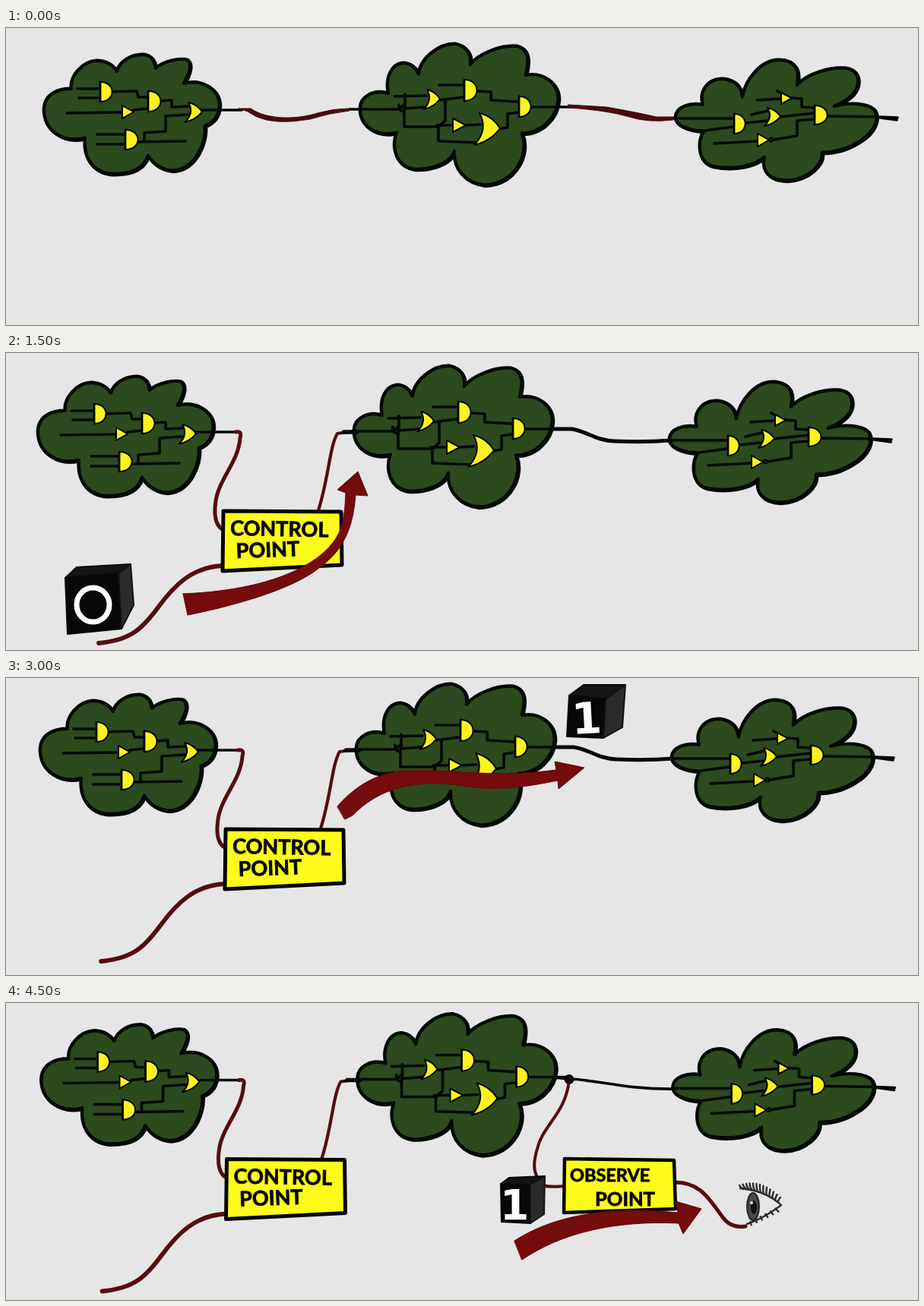
These frames come from a looping animation (1200x391 px, 6 s). An HTML page:

```html
<!DOCTYPE html>
<html lang="en">
<head>
<meta charset="utf-8">
<title>Control and observe points</title>
<style>
  html, body { margin: 0; width: 100%; height: 100%; overflow: hidden; background: #e6e6e6; }
  svg { display: block; width: 100%; height: 100%; }
  path, circle, ellipse { stroke-linecap: round; stroke-linejoin: round; }
  .cloud { fill: #2c4a1d; stroke: #030806; stroke-width: 4.4; }
  .shade { fill: #030806; stroke: #030806; stroke-width: 4.5; }
  .wire { fill: none; stroke: #030806; stroke-width: 3.7; }
  .gate { fill: #fdf220; stroke: #030806; stroke-width: 2; }
  .cord { fill: none; stroke: #560d10; stroke-width: 5; }
  .ribbon { fill: #480b0e; stroke: #480b0e; stroke-width: 1; }
  .arrow { fill: #740b0d; stroke: #640709; stroke-width: 1; }
  .panel { fill: #fcfb1b; stroke: #050505; stroke-width: 5; }
  .label { font: 700 27px Lato, "Open Sans", sans-serif; fill: #090906; stroke: #090906; stroke-width: .8; }
  .digit { font: 700 57px "DejaVu Sans", sans-serif; fill: #fff; }
  .eye { fill: none; stroke: #2c2c2c; stroke-width: 2.4; }
</style>
</head>
<body>
<svg viewBox="0 0 1200 391" preserveAspectRatio="none"><g id="world"></g></svg>
<script>
const HOLD = 1500;
const world = document.getElementById("world");

const path = (cls, d, extra = "") => `<path class="${cls}" d="${d}" ${extra}/>`;
const text = (cls, x, y, s, extra = "") => `<text class="${cls}" x="${x}" y="${y}" ${extra}>${s}</text>`;
const cloud = d => path("shade", d, 'transform="translate(1 1)"') + path("cloud", d, 'transform="translate(-.2 -.2)"');
// Gates take their top left corner, width and height.
const and = (x, y, w, h) => path("gate", `M${x} ${y}C${x + 1.3 * w} ${y} ${x + 1.3 * w} ${y + h} ${x} ${y + h}Z`)
  + path("wire", `M${x} ${y}v${h}`, 'style="stroke-width:2.8"');
const or = (x, y, w, h) => path("gate", `M${x} ${y}Q${x + .65 * w} ${y + .1 * h} ${x + w} ${y + .48 * h}
  Q${x + .55 * w} ${y + .88 * h} ${x - .25 * w} ${y + h}Q${x + .45 * w} ${y + .52 * h} ${x} ${y}Z`);
const tri = (x, y, w, h) => path("gate", `M${x} ${y}L${x + w} ${y + h / 2}L${x} ${y + h}Z`);
// Shows its content only in the listed scenes, drawn at its own offset.
const only = (scenes, x, y, content) => `<g data-scenes="${scenes}" transform="translate(${x} ${y})">${content}</g>`;
const cube = (front, top, side) => path("", front, 'fill="#070809" stroke="#070809" stroke-width="2"')
  + path("", top, 'fill="#141516" stroke="#070809" stroke-width="2"')
  + path("", side, 'fill="#292a2b" stroke="#101112" stroke-width="2"');

const clouds =
  cloud(`M86 80C84 64 100 44 120 43Q138 44 146 57C150 44 164 35 181 35C190 36 196 42 197 53
    C207 44 228 39 239 42C246 48 241 62 234 73C258 67 281 80 281 102Q280 122 262 129C264 150 250 186 220 188
    Q198 186 187 168C180 190 155 193 136 192C110 188 102 166 104 145C76 152 50 136 50 107C51 86 70 80 86 80Z`) +
  cloud(`M503 86C499 64 508 46 525 46Q538 48 543 61C545 40 570 20 592 21C606 24 613 34 611 48
    C622 34 652 22 673 24C690 28 688 46 684 62C708 58 728 73 727 95C725 118 705 139 679 139C690 165 670 206 630 207
    C604 204 589 186 590 162C585 180 556 187 538 186C513 183 507 157 514 138C488 144 465 130 466 105
    C467 90 485 80 503 86Z`) +
  cloud(`M917 101C912 84 922 67 944 67C960 69 968 78 969 91C973 68 993 42 1018 42C1040 43 1045 56 1041 75
    C1055 60 1085 51 1106 53C1125 56 1125 76 1114 88Q1104 98 1090 103C1112 97 1135 100 1143 108
    C1150 120 1143 138 1122 150Q1100 164 1074 164C1076 180 1055 200 1028 201C1004 201 994 188 998 170
    C985 183 955 187 930 182C910 177 910 150 918 136C895 135 880 127 881 117C882 104 900 98 917 101Z`);

const circuits =
  path("wire", `M94 80H121M96 92H121M139 84L172 83L174 91H186M80 112L153 111M168 108L187 106
    M203 96L218 95V104L240 103M120 140H155M120 153H155M174 150L236 149M182 149V138L210 136V116L240 114M257 108H310`) +
  and(124, 71, 16, 26) + tri(153, 102, 15, 17) + and(187, 83, 17, 27) + or(240, 98, 18, 26) + and(157, 134, 17, 26) +
  path("wire", `M452 107H517L524 101M511 90L553 89M525 87V106L553 104M524 106V130H570M517 101V107L524 111
    M570 95L602 91M578 94V122L569 130V149L622 151M567 128H588M570 75H601M619 83L638 84V95L673 97
    M605 128L624 127M648 133L660 131V113L675 111M690 104H746`) +
  and(603, 68, 17, 28) + or(554, 81, 17, 26) + tri(588, 119, 17, 18) + or(623, 112, 27, 42) + and(675, 90, 16, 27) +
  path("wire", `M880 119H957M920 135L957 130M973 125L1002 122M981 114L1003 109M1018 117L1064 112M988 95L1019 93
    M1015 83L1022 87M1033 92L1047 93V104L1062 105M932 152L989 149M1010 147L1041 142V122L1064 120
    M1081 116L1148 117L1173 118M1150 118L1172 121`) +
  and(958, 113, 15, 26) + or(1002, 105, 17, 24) + tri(1020, 85, 14, 15) + tri(989, 139, 15, 17) +
  '<circle class="wire" cx="1007" cy="147" r="2.3" style="stroke-width:2.5"/>' + and(1064, 102, 17, 25);

const plainLinks = only("0", 0, 0,
  path("ribbon", `M306 106L322 106C345 122 385 120 410 112Q430 106 452 106V109Q425 112 400 120Q355 128 330 117L318 110Z`) +
  path("ribbon", `M740 101L790 104Q835 112 855 117H880L878 121Q845 125 820 117Q790 108 740 105Z`));

const control = only("123", 8, 4,
  path("cord", "M302 104Q311 102 308 112C306 143 280 166 276 195Q272 222 283 231") +
  path("cord", "M450 104L436 106C426 122 424 168 411 207", 'style="stroke-width:4.2"') +
  path("wire", "M442 105H462") +
  path("cord", "M285 280C245 282 222 305 200 335C180 362 165 378 122 382", 'style="stroke-width:5.8"') +
  path("panel", "M286 208L441 209L442 279L285 287Z") +
  '<g transform="rotate(1 300 240)">' + text("label", 295, 240, "CONTROL") + "</g>" +
  text("label", 303, 270, "POINT", 'transform="rotate(-2 303 270)"'));

const bentLink = only("12", 8, 4, path("wire", "M720 100H744C765 103 775 115 800 116Q840 118 875 115", 'style="stroke-width:5"'));

const inject = only("1", 8, 4,
  cube("M78 296L148 290L152 363L81 370Z", "M78 296L93 282L164 278L148 290Z", "M148 290L164 278L168 332L152 363Z") +
  '<ellipse cx="114.5" cy="331.5" rx="21.5" ry="22.5" fill="none" stroke="#fff" stroke-width="7"/>' +
  path("arrow", `M233 317L239 345C290 335 375 313 412 283C448 257 457 224 460 187L476 188L463 156L436 180L447 184
    C445 222 444 243 409 270C367 300 304 314 233 317Z`));

const propagate = only("2", 5, 13,
  cube("M741 23L789 28L786 79L738 77Z", "M741 23L760 9L815 9L789 28Z", "M789 28L815 9L811 65L786 79Z") +
  text("digit", 744, 73, "1", 'transform="rotate(-3 764 52)"') +
  path("arrow", `M436 169C465 135 500 122 530 122C590 120 640 132 724 121L722 110L761 118L727 146L726 135
    C690 142 650 150 600 142C540 132 490 145 456 181L446 186Z`));

// Lashes fan out along both lids.
let lashes = "";
for (let i = 0; i < 13; i++) {
  const u = i / 12, x = 970 + 46 * u, y = 245 + 16 * u * u;
  lashes += `M${x} ${y}q${-4 + 5 * u} -3 ${-5 + 8 * u} ${-5 - 5 * Math.sin(u * Math.PI)}`;
  if (i % 2) lashes += `M${976 + 40 * u} ${290 - 21 * u}l${1 + 3 * u} 4`;
}

const observe = only("3", 3.5, 6.5,
  path("wire", "M720 98L741 100C778 101 815 114 880 113") +
  path("cord", "M741 101C737 145 706 161 699 192Q692 215 698 227M705 240Q718 243 735 241", 'style="stroke-width:4"') +
  '<circle cx="741" cy="100.5" r="6.5" fill="#100707"/>' +
  path("cord", "M880 236C914 236 925 258 943 282Q954 297 973 294") +
  path("panel", "M735 205L879 207L881 271L734 276Z", 'style="stroke-width:4.5"') +
  text("label", 742, 235, "OBSERVE", 'style="font-size:23.5px"') +
  text("label", 775, 267, "POINT", 'style="font-size:25.5px"') +
  cube("M651 238L690 239L690 290L652 288Z", "M651 238L662 230L709 228L690 239Z", "M690 239L709 228L708 278L690 290Z") +
  text("digit", 650, 285, "1", 'style="font-size:55px"') +
  path("arrow", "M669 313C720 280 790 267 884 276L881 261L915 271L891 304L885 290C800 286 730 303 679 338Z") +
  path("eye", "M966 244Q1000 247 1020 266Q998 283 975 291") +
  '<ellipse cx="983" cy="268" rx="8" ry="18" fill="#46494a" stroke="#252727" stroke-width="2"/>' +
  '<ellipse cx="984" cy="269" rx="4" ry="9" fill="#111"/><circle cx="981" cy="263" r="2" fill="#ddd"/>' +
  path("eye", lashes));

world.innerHTML = clouds + circuits + plainLinks + bentLink + control + inject + propagate + observe;

const camera = [[0, 0], [-8, -4], [-5, -13], [-3.5, -6.5]];
const parts = [...world.querySelectorAll("[data-scenes]")];
let shown = -1;

function draw(now) {
  const scene = Math.floor(now / HOLD) % camera.length;
  if (scene !== shown) {
    shown = scene;
    world.setAttribute("transform", `translate(${camera[scene]})`);
    for (const p of parts) p.style.display = p.dataset.scenes.includes(scene) ? "" : "none";
  }
  requestAnimationFrame(draw);
}
draw(performance.now());
</script>
</body>
</html>
```
